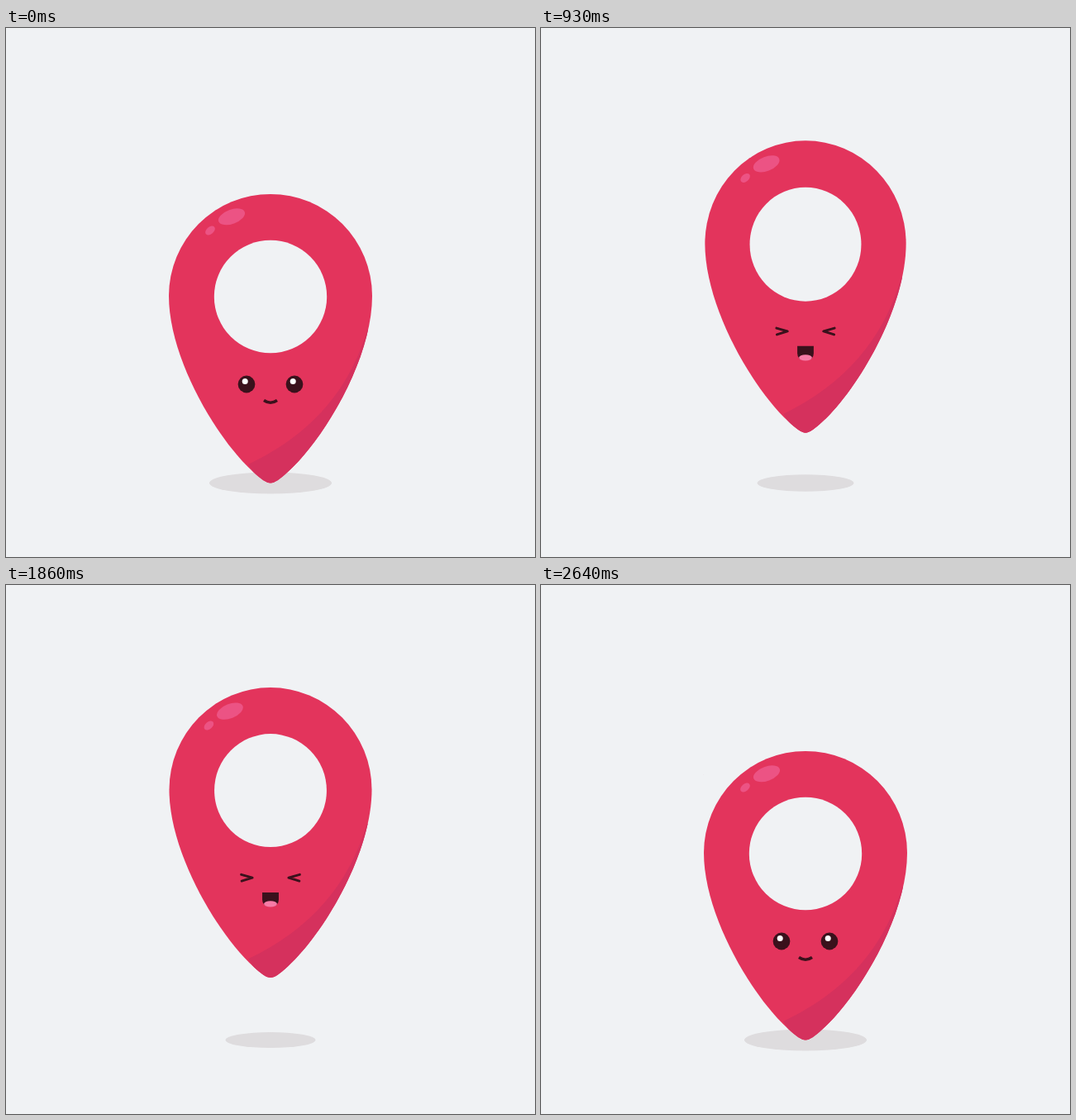
Animation, 640 px wide and 640 px high, one loop 3.21 s. Source, as an HTML page:

```html
<!DOCTYPE html>
<html lang="en">
<head>
<meta charset="utf-8">
<title>Jumping map pin</title>
<style>
  html, body { margin: 0; height: 100%; overflow: hidden; background: #f0f2f4; }
  svg { display: block; width: 100vw; height: 100vh; }
</style>
</head>
<body>
<svg viewBox="0 0 640 640">
  <defs>
    <path id="drop" d="M320 201A123 123 0 0 1 443 324C443 400 385 497 341 537C331 546 325 550.5 320 550.5C315 550.5 309 546 299 537C255 497 197 400 197 324A123 123 0 0 1 320 201Z"/>
    <clipPath id="body"><use href="#drop"/></clipPath>
    <g id="eye">
      <circle cx="291" cy="431" r="10.4" fill="#3a111c"/>
      <circle cx="289.2" cy="427.5" r="3.5" fill="#fff"/>
    </g>
  </defs>
  <ellipse id="shadow" cx="320" cy="550.5" fill="#dedcde"/>
  <g id="pin">
    <use href="#drop" fill="#e3345c"/>
    <path d="M437 365Q405 475 293 528L320 570L470 570V365Z" fill="#d5315d" clip-path="url(#body)"/>
    <g id="shine" fill="#ec5384">
      <ellipse rx="16.8" ry="8.6" transform="translate(273 228.3) rotate(-20)"/>
      <ellipse rx="6.7" ry="4.4" transform="translate(247 245) rotate(-40)"/>
    </g>
    <circle cx="320" cy="325" r="68.2" fill="#f0f2f4"/>
    <g id="calm">
      <use href="#eye"/>
      <use href="#eye" x="58"/>
      <path d="M312 450.5Q320 456 328 450.5" fill="none" stroke="#3a111c" stroke-width="3.5"/>
    </g>
    <g id="happy">
      <path d="M284.5 427L298 430.7L285 434.7M355.5 427L342 430.7L355 434.7" fill="none" stroke="#3a111c" stroke-width="3" stroke-linecap="round" stroke-linejoin="round"/>
      <path d="M310 448.5H330V457Q330 465.5 320 465.5Q310 465.5 310 457Z" fill="#3a111c"/>
      <ellipse cx="320" cy="462.3" rx="8" ry="3.6" fill="#f77ba6"/>
    </g>
  </g>
</svg>
<script>
const STEP = 30, LOOP = 3210;
const START = 10, TAKEOFF = 16, LANDING = 82, END = 88;
const FIRST_PEAK = 26, PERIOD = 16, HALF = 8;
const $ = id => document.getElementById(id);
const mix = (a, b, k) => a + (b - a) * k;

// Vertical scale as [step, value] keys: crouch, four jumps, settle.
const stretch = [[START, 1], [TAKEOFF, .91], [19, 1.02], [23, 1]];
for (let land = FIRST_PEAK + HALF; land <= LANDING; land += PERIOD) {
  const last = land === LANDING;
  stretch.push([land - 5, 1], [land - 2, 1.015], [land, last ? .935 : .959]);
  if (!last) stretch.push([land + 2, 1.01], [land + 4, 1]);
}
stretch.push([END, 1]);

function sample(keys, n) {
  const i = keys.findIndex(key => key[0] > n);
  if (i < 1) return 1;
  const [n0, v0] = keys[i - 1], [n1, v1] = keys[i];
  const k = (n - n0) / (n1 - n0);
  return mix(v0, v1, k * k * (3 - 2 * k));
}

// Remaining distance to the peak, 0 at the top and 1 on the ground.
function drop(n, rise, fall) {
  if (n <= TAKEOFF || n >= LANDING) return 1;
  const jump = Math.max(0, Math.floor((n - FIRST_PEAK + HALF) / PERIOD));
  const d = n - FIRST_PEAK - jump * PERIOD;
  if (d >= 0) return (d / HALF) ** fall;
  return (-d / (jump ? HALF : FIRST_PEAK - TAKEOFF)) ** rise;
}

function draw(n) {
  const sy = sample(stretch, n), sx = 2 - sy;
  const lift = 104 * (1 - drop(n, 3.5, 1.87));
  const crouch = Math.min(1, Math.max(0, (n - START) / (TAKEOFF - START)));
  const settle = Math.min(1, Math.max(0, (END - n) / (END - LANDING)));
  const turn = (3 - 6 * lift / 104) * crouch * settle;
  const ground = n >= LANDING ? 74 : mix(74, 78, crouch);
  const rx = mix(48.7, ground, drop(n, 3.3, 2.35));
  const happy = n >= TAKEOFF && n < LANDING;

  $("pin").setAttribute("transform",
    `translate(320 ${550.5 - lift}) scale(${sx} ${sy}) translate(-320 -550.5)`);
  $("shine").setAttribute("transform", `rotate(${turn} 320 325)`);
  $("shadow").setAttribute("rx", rx);
  $("shadow").setAttribute("ry", rx * .176);
  $("happy").setAttribute("transform", `translate(0 ${-150 * Math.max(0, sy - 1)})`);
  $("happy").style.display = happy ? "" : "none";
  $("calm").style.display = happy ? "none" : "";
}

const begin = performance.now();
function tick() {
  draw(Math.floor((performance.now() - begin) % LOOP / STEP));
  requestAnimationFrame(tick);
}
tick();
</script>
</body>
</html>
```
